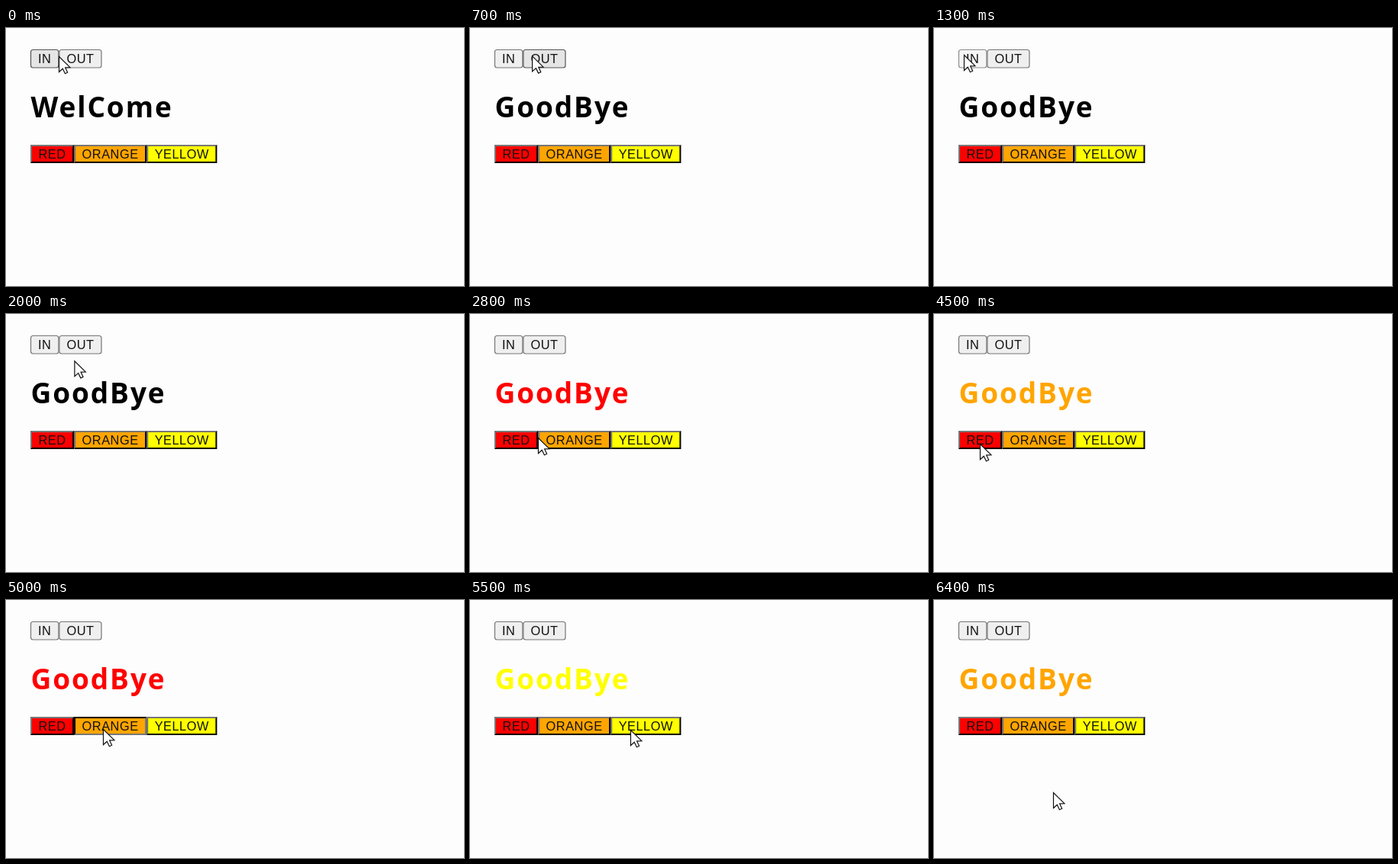
These frames come from a looping animation (600x338 px, 6.5 s). An HTML page with a canvas:

```html
<!DOCTYPE html>
<html lang="en">
<head>
<meta charset="utf-8">
<title>Buttons and heading</title>
<style>
html, body { margin: 0; width: 100%; height: 100%; overflow: hidden; background: #fdfdfe; }
canvas { display: block; }
</style>
</head>
<body>
<canvas id="stage" width="600" height="338"></canvas>
<script>
const ctx = document.getElementById('stage').getContext('2d');
const LOOP = 6500, STEP = 100, REST = 2 * STEP;
const LEFT = 32;
const BG = '#fdfdfe';
const fills = { RED: '#ff0000', ORANGE: '#ffa500', YELLOW: '#ffff00' };

function labelStyle() {
  ctx.font = '16.4px "Liberation Sans", Arial, sans-serif';
  ctx.letterSpacing = '0.5px';
  ctx.textAlign = 'left';
  ctx.fillStyle = '#111111';
}

// Lays buttons side by side, each as wide as its label plus padding.
function row(names, y, h, pad) {
  let x = LEFT;
  labelStyle();
  return names.map(name => {
    const w = ctx.measureText(name).width + pad;
    const button = { name, x, y, w, h, pad, fill: fills[name] };
    x += w;
    return button;
  });
}

const buttons = [
  ...row(['IN', 'OUT'], 28, 24.5, 20),
  ...row(Object.keys(fills), 153, 24, 21)
];

const home = { t: 0, x: 69, y: 37 };
const end = { t: 6400, x: 156, y: 252 };

// At each visit the pointer arrives, rests, and clicks in the second half of the rest.
const visits = [
  { t: 300, x: 98, y: 37, name: 'OUT' },
  { t: 1200, x: 39, y: 35, name: 'IN' },
  { t: 1700, x: 98, y: 36, name: 'OUT' },
  { t: 2400, x: 55, y: 162, name: 'RED' },
  { t: 3000, x: 123, y: 162, name: 'ORANGE' },
  { t: 3700, x: 239, y: 164, name: 'YELLOW' },
  { t: 4100, x: 145, y: 167, name: 'ORANGE' },
  { t: 4500, x: 60, y: 170, name: 'RED' },
  { t: 4900, x: 127, y: 169, name: 'ORANGE' },
  { t: 5300, x: 210, y: 170, name: 'YELLOW' },
  { t: 5700, x: 127, y: 166, name: 'ORANGE' }
];

function stateAt(t) {
  const state = { text: 'WelCome', color: '#000000', pressed: null };
  let last = home, leave = 0;
  for (const visit of visits) {
    if (t < visit.t) break;
    last = visit;
    leave = visit.t + REST;
    if (t >= leave) {
      if (fills[visit.name]) state.color = fills[visit.name];
      else state.text = visit.name === 'IN' ? 'WelCome' : 'GoodBye';
    } else if (t >= visit.t + STEP) {
      state.pressed = visit.name;
    }
  }
  const next = visits[visits.indexOf(last) + 1] || end;
  const k = Math.min(1, Math.max(0, (t - leave) / (next.t - leave)));
  state.pointer = {
    x: last.x + (next.x - last.x) * k,
    y: last.y + (next.y - last.y) * k
  };
  return state;
}

function polygon(points, fill) {
  ctx.beginPath();
  points.forEach(([x, y]) => ctx.lineTo(x, y));
  ctx.closePath();
  ctx.fillStyle = fill;
  ctx.fill();
}

function plainFace({ x, y, w, h }, hover, down) {
  ctx.beginPath();
  ctx.roundRect(x + 0.5, y + 0.5, w - 1, h - 1, 3);
  ctx.fillStyle = down ? '#f5f5f5' : hover ? '#e5e5e5' : '#efefef';
  ctx.fill();
  ctx.strokeStyle = down ? '#8d8d8d' : hover ? '#555555' : '#767676';
  ctx.lineWidth = 1.2;
  ctx.stroke();
}

function bevelFace({ x, y, w, h, fill }, down) {
  const r = x + w, b = y + h, e = 2;
  const light = '#767676', dark = '#000000';
  ctx.fillStyle = down ? light : dark;
  ctx.fillRect(x, y, w, h);
  polygon([[x, y], [r, y], [r - e, y + e], [x + e, y + e], [x + e, b - e], [x, b]],
    down ? dark : light);
  ctx.fillStyle = fill;
  ctx.fillRect(x + e, y + e, w - 2 * e, h - 2 * e);
}

function drawButton(b, pointer, pressed) {
  const down = pressed === b.name;
  const hover = pointer.x >= b.x && pointer.x < b.x + b.w &&
    pointer.y >= b.y && pointer.y < b.y + b.h;
  if (b.fill) bevelFace(b, down);
  else plainFace(b, hover, down);
  labelStyle();
  ctx.fillText(b.name, b.x + b.pad / 2, b.y + b.h / 2 + 5.7);
}

function drawHeading(text, color) {
  ctx.font = '700 37px "Open Sans", "Noto Sans", sans-serif';
  ctx.letterSpacing = '1.9px';
  ctx.textAlign = 'left';
  ctx.fillStyle = color;
  ctx.fillText(text, LEFT + 0.5, 117);
}

function drawPointer({ x, y }) {
  const shape = [[0, 0], [0, 17], [4, 13.3], [6.6, 18.8], [9.3, 17.6], [6.8, 12.2], [12, 12]];
  polygon(shape.map(([px, py]) => [x + 0.5 + px * 1.2, y + 0.5 + py * 1.18]), '#ffffff');
  ctx.strokeStyle = '#111111';
  ctx.lineWidth = 1.2;
  ctx.stroke();
}

function draw(now) {
  const t = Math.floor((now % LOOP) / STEP) * STEP;
  const { text, color, pressed, pointer } = stateAt(t);
  ctx.fillStyle = BG;
  ctx.fillRect(0, 0, 600, 338);
  buttons.forEach(b => drawButton(b, pointer, pressed));
  drawHeading(text, color);
  drawPointer(pointer);
}

const start = performance.now();
function tick() {
  draw(performance.now() - start);
  requestAnimationFrame(tick);
}
tick();
</script>
</body>
</html>
```
